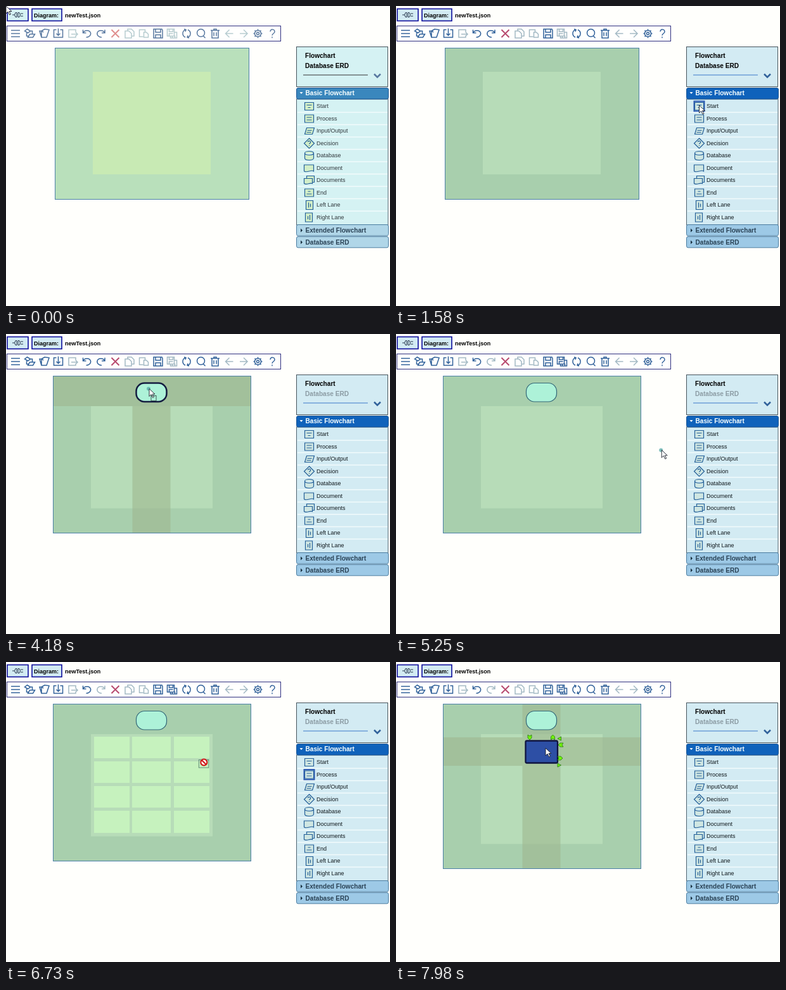
Recreate the animation shown at these times as an HTML page. Size 606 px wide and 474 px high, loop 8000 ms.

```html
<!DOCTYPE html>
<html lang="en">
<head>
<meta charset="utf-8">
<title>Flowchart editor</title>
<style>
html, body { margin: 0; width: 100%; height: 100%; overflow: hidden; background: #fffffc }
svg {
  display: block; width: 606px; height: 474px; font: 9px "Liberation Sans", Arial, sans-serif;
  --panel: #d3ebf3; --head: #0f62bb; --sub: #9dc9e6; --outer: #a8cfad; --inner: #b7dcb8;
  --ink: #31619a; --dim: #a3b9c4; --cross: #b84c70; --icon: #cfe6e2; --rule: #3a78c8; --text: #10181c;
}
svg.pale {
  --panel: #d5f2f3; --head: #3a87bd; --sub: #b0d6e8; --outer: #b9e0bb; --inner: #c8eab4;
  --ink: #5878a0; --dim: #b6ccd0; --cross: #e09090; --icon: #d3efc8; --rule: #333; --text: #30383c;
}
.bold { font-weight: bold }
.head { font-weight: bold; font-size: 10.1px }
.icon { fill: none; stroke: var(--ink); stroke-width: 1.5 }
.off { stroke: var(--dim) }
.button { fill: var(--panel); stroke: #0c0c9c; stroke-width: 1.6 }
.shape { fill: var(--icon); stroke: #245f98; stroke-width: 1.2 }
</style>
</head>
<body>
<svg id="stage" viewBox="0 0 606 474">
  <g id="chrome"></g>
  <g id="diagram"></g>
  <g id="pointer"></g>
</svg>
<script>
const LOOP = 8000;
const $ = id => document.getElementById(id);
const rect = (x, y, right, bottom, attrs = '') =>
  `<rect x="${x}" y="${y}" width="${right - x}" height="${bottom - y}" ${attrs}/>`;
const text = (x, y, s, attrs = '') => `<text x="${x}" y="${y}" ${attrs}>${s}</text>`;
const at = (x, y, s) => `<g transform="translate(${x} ${y})">${s}</g>`;
const path = (d, attrs = '') => `<path d="${d}" ${attrs}/>`;

// Toolbar icons are drawn around (0, 0); a third value marks a disabled one.
const tools = [
  ['menu', 'M-7-5H7M-7 0H7M-7 5H7'],
  ['shapes', 'M-8-4L-4-7 1-4 -3-1ZM0 1H8L5 6H-3ZM-5-1V4H-2M1-4H4V1'],
  ['open', 'M-4 6L-7-4H-3L-1-2M-4 6H4L8-6 1-7 -4-4Z'],
  ['import', 'M-3-6H-7V6H7V-6H3M0-8V3M-3 0L0 3 3 0'],
  ['export', 'M5-2V-6H-6V6H5V3M-2 1H8M5-2L8 1 5 4', 1],
  ['undo', 'M-6-6V-1H-1M-6-1C-3-6 4-6 6-1C7 3 3 6-1 6'],
  ['redo', 'M6-6V-1H1M6-1C3-6-4-6-6-1C-7 3-3 6 1 6'],
  ['remove', 'M-6-6L6 6M6-6L-6 6'],
  ['copy', 'M-3-4V-7H3L7-3V4H3M-7-4H-1L3 0V7H-7Z', 1],
  ['paste', 'M-1 5H-7V-6H2V-2M0-2H4L7 1V6H0Z', 1],
  ['save', 'M-7-7H6L7-5V7H-7ZM-4-7V-2H4V-7M-4 7V2H4V7'],
  ['saveAll', 'M-8-7H3V4H-8ZM-5-7V-3H1V-7M-5 4V0H1M3-2H7V7H-3V4M0 7V4H4V7'],
  ['refresh', 'M-2 6C-8 3-7-5-1-6M-4-7L-1-6-2-3M2-6C8-3 7 5 1 6M4 7L1 6 2 3'],
  ['zoom', 'M-6-1A6 6 0 1 0 6-1A6 6 0 1 0-6-1M4 4L7 7'],
  ['trash', 'M-7-5H7M-2-5V-7H2V-5M-5-5V7H5V-5M-2-2V4M2-2V4'],
  ['back', 'M6 0H-5M0-6L-6 0 0 6', 1],
  ['forward', 'M-6 0H5M0-6L6 0 0 6', 1],
  ['gear', 'M-2 0A2 2 0 1 0 2 0A2 2 0 1 0-2 0M-5 0A5 5 0 1 0 5 0A5 5 0 1 0-5 0'
    + 'M0-5V-7M0 5V7M-5 0H-7M5 0H7M-4-4L-5-5M4-4L5-5M-4 4L-5 5M4 4L5 5'],
  ['help', 'M-3-3C-3-8 4-7 4-3C4 0 0 0 0 3M0 5V7'],
];

const box = 'M-7-6H7V6H-7Z';
const items = [
  ['Start', box + 'M-4-2H4M-2 2H2'],
  ['Process', box + 'M-4-2H4M-4 2H4'],
  ['Input/Output', 'M-7 5L-4-5H8L5 5ZM-3-1H4M-4 2H3'],
  ['Decision', 'M0-8L8 0 0 8-8 0ZM-2-2C-2-5 3-4 2-1L0 1M0 3V4'],
  ['Database', 'M-7-4C-7-8 7-8 7-4V4C7 8-7 8-7 4ZM-7-4C-7 0 7 0 7-4'],
  ['Document', 'M-8-5H7V5C3 2-3 8-8 5Z'],
  ['Documents', 'M-4-3V-7H8V3H5M-8-3H5V5C1 3-4 8-8 5Z'],
  ['End', box + 'M-2-2H2M-4 2H4'],
  ['Left Lane', 'M-5-7H6V7H-5ZM-1-4V4M2-2V3'],
  ['Right Lane', 'M-6-7H5V7H-6ZM-2-2V3M1-4V4'],
];

function drawChrome() {
  let s = rect(2, 4.5, 35, 23.5, 'class="button"')
    + path('M10 14H13M23 12H27M23 16H27M17 10.500H15Q12 14 15 17.500H17ZM19 10.500H21Q24 14 21 17.500H19Z',
      'fill="none" stroke="#26364c"')
    + rect(41, 4.5, 88, 23.5, 'class="button"')
    + text(44, 17.5, 'Diagram:', 'class="bold"')
    + text(93, 17.5, 'newTest.json', 'class="bold"')
    + rect(1.5, 31.5, 433.5, 55.5, 'fill="#fffffe" stroke="#303080"');
  tools.forEach(([name, d, off], i) => {
    const color = name === 'remove' ? 'style="stroke:var(--cross);stroke-width:2"' : '';
    s += at(15 + 22.5 * i, 43.5, path(d, `id="${name}" class="icon ${off ? 'off' : ''}" ${color}`));
  });

  s += rect(458.5, 64.5, 602.5, 127.5, 'fill="var(--panel)" stroke="#46545c"')
    + text(472, 82, 'Flowchart', 'class="head"')
    + text(472, 98, 'Database ERD', 'class="head" id="erd"')
    + path('M469 109H571', 'stroke="var(--rule)"')
    + path('M581 107.500L586 112.500 591 107.500', 'class="icon" style="stroke-width:2.5"')
    + rect(458.5, 147, 603, 346, 'fill="var(--panel)" stroke="#506470"')
    + rect(458.5, 129.5, 603.5, 147, 'rx="2.5" fill="var(--head)" stroke="#1d5794"')
    + path('M463.500 136H468.500L466 139Z', 'fill="#fff"')
    + text(472.5, 141, 'Basic Flowchart', 'class="head" fill="#f8ffff"')
    + rect(470.5, 150.5, 486.5, 166.5, 'id="chosen" fill="#a5c4e2" stroke="#2e5bb4" stroke-width="2"');
  items.forEach(([label, d], i) => {
    const y = 158.5 + 19.5 * i;
    if (i) s += path(`M460 ${y - 10}H602`, 'stroke="#f2fbfc" stroke-width="1.5"');
    s += at(478.5, y, path(d, 'class="shape"'))
      + text(490, y + 2.5, label, 'fill="var(--text)"');
  });
  ['Extended Flowchart', 'Database ERD'].forEach((label, i) => {
    const y = 345.5 + 18.8 * i;
    s += rect(458.5, y, 603.5, y + 17.5, 'rx="2.5" fill="var(--sub)" stroke="#4a7ca0"')
      + path(`M465 ${y + 6}V${y + 12}L468 ${y + 9}Z`, 'fill="#183040"')
      + text(472.5, y + 12.2, label, 'class="head" fill="#2b4356"');
  });
  $('chrome').innerHTML = s;
}

const cells = (columns, rows) => rows.map(([top, bottom]) => columns.map(([left, right]) =>
  rect(left, top, right, bottom, 'fill="#c6f2be"')).join('')).join('');
const bands = (top, bottom, end) =>
  path(`M74 ${top}H386V${bottom}H259.500V${end}H199.500V${bottom}H74ZM199.500 66H259.500V${top}H199.500Z`,
    'fill="#9fb890" opacity=".6"');

const handles = [
  [211, 119, 90], [247.5, 119, -90], [260, 131, 180], [259, 152, 0],
].map(([x, y, turn]) => `<g transform="translate(${x} ${y}) rotate(${turn})">${
  path('M-4-3H1L4 0 1 3H-4L-2 0Z')}</g>`).join('')
  + path('M255 121L260.500 118V124ZM255 160V166L260.500 163Z');

function drawDiagram(t) {
  const started = t >= 4130, processed = t >= 7780;
  const bottom = processed ? 327 : started ? 315 : 306;
  const hovered = started && t < 4720;
  let s = started
    ? rect(74, 66, 386.5, bottom, 'fill="var(--outer)"')
      + rect(134, 114, 326, bottom - 39.5, 'fill="var(--inner)"')
    : rect(77, 66, 383.5, bottom, 'fill="var(--outer)"')
      + rect(137, 104, 323, 266, 'fill="var(--inner)"');

  if (t >= 1800 && !started)
    s += cells([[142, 197], [202, 257], [262, 317]], [[70, 104]]);
  if (t >= 6350 && !processed)
    s += cells([[139, 195], [199, 260], [265, 321]], [[118, 152], [157, 191], [196, 230], [235, 270]]);
  if (hovered) s += bands(66, 114, bottom);
  if (processed) s += bands(119, 164, bottom);
  const left = started ? 74 : 77;
  s += rect(left + .5, 66.5, 460.5 - left, bottom - .5, 'fill="none" stroke="#4c80a8"');
  if (started) s += rect(205.5, 77.5, 253.5, 107,
    `rx="13" fill="#adf2d8" stroke="${hovered ? '#141c40' : '#346878'}" stroke-width="${hovered ? 2.5 : 1.2}"`);
  if (processed) s += rect(204.5, 124.5, 255, 159.5,
    'rx="2" fill="#2d4fa5" stroke="#101440" stroke-width="2.3"')
    + `<g fill="#72f20c" stroke="#287818" stroke-width=".8">${handles}</g>`;
  $('diagram').innerHTML = s;
}

const route = [
  [30, 0, 0], [800, 330, 150], [850, 330, 150], [1580, 478.5, 157], [1800, 478.5, 157],
  [2580, 245, 138], [2630, 245, 138], [2900, 219, 101.5], [3350, 222, 91], [3630, 222, 91],
  [3930, 226, 86.5], [4630, 226, 86.5], [5250, 419, 183.5], [5430, 456, 163], [5500, 467, 168],
  [5850, 467, 168], [6180, 478.5, 177], [6350, 478.5, 177], [6730, 312.5, 158.5],
  [7150, 240, 138], [7180, 240, 138], [7480, 236, 136], [LOOP, 236, 136],
];
function pointerAt(t) {
  const i = route.findIndex(stop => stop[0] >= t);
  if (i <= 0) return route[0].slice(1);
  const [t0, x0, y0] = route[i - 1], [t1, x1, y1] = route[i];
  const k = (t - t0) / (t1 - t0);
  return [x0 + (x1 - x0) * k, y0 + (y1 - y0) * k];
}

const arrow = path('M0 0V12L3 9 5.500 14 7.500 13 5 8.500H9Z', 'fill="#fff" stroke="#181c28" stroke-width=".9"');
const forbidden = rect(-8, -4, 7.5, 8.5, 'fill="none" stroke="#568270" stroke-width=".9"')
  + '<circle r="5" fill="#fffbf4" stroke="#d01818" stroke-width="2.1"/>'
  + path('M-3.500-3.500L3.500 3.500', 'stroke="#d01818" stroke-width="2.1"');
const copyBox = rect(3, 11, 11, 19, 'fill="none" stroke="#344c48" stroke-width=".9"');
const halo = '<circle cx="-1" r="3" fill="#55aaa8" opacity=".75"/>';

function drawPointer(t) {
  const [x, y] = pointerAt(t);
  const blocked = (t >= 1800 && t < 3350) || (t >= 6350 && t < 7150);
  const copying = (t >= 3350 && t < 4400) || (t >= 7150 && t < 7780);
  const pressed = t >= 4130 && t < 5430;
  $('pointer').innerHTML = at(x, y,
    blocked ? forbidden : (pressed ? halo : '') + arrow + (copying ? copyBox : ''));
}

function draw(t) {
  $('stage').classList.toggle('pale', t < 30);
  const choice = t >= 1500 && t < 4130 ? 0 : t >= 6100 && t < 7780 ? 1 : -1;
  $('chosen').setAttribute('visibility', choice < 0 ? 'hidden' : 'visible');
  $('chosen').setAttribute('transform', `translate(0 ${Math.max(choice, 0) * 19.5})`);
  $('erd').setAttribute('fill', t >= 4130 ? '#8c9ca4' : '#000');
  $('redo').classList.toggle('off', t >= 4250);
  $('saveAll').classList.toggle('off', t < 4250);
  drawDiagram(t);
  drawPointer(t);
}

drawChrome();
const begin = performance.now();
function tick() {
  draw((performance.now() - begin) % LOOP);
  requestAnimationFrame(tick);
}
tick();
</script>
</body>
</html>
```
